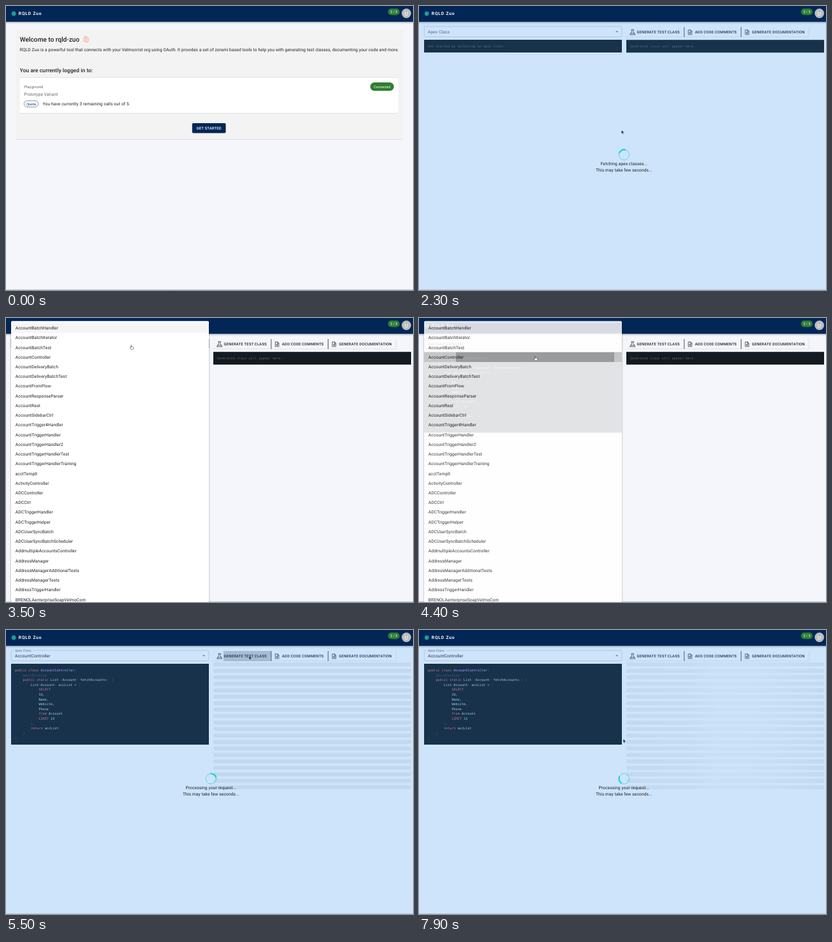
These frames come from a looping animation (640 by 446 pixels, 8000 ms). An HTML page:

```html
<!DOCTYPE html>
<html lang="en">
<head>
<meta charset="utf-8">
<title>RLTC Zuo</title>
<style>
html, body { margin: 0; width: 100%; height: 100%; overflow: hidden; background: #f4f6fb; }
svg { display: block; width: 100vw; height: 100vh; font: 6.77px Roboto, sans-serif; text-rendering: geometricPrecision; }
text { fill: rgba(0,0,0,.87); letter-spacing: .0094em; white-space: pre; }
.mid { text-anchor: middle; }
.grey { fill: rgba(0,0,0,.6); }
.h5 { font-size: 10.16px; font-weight: 500; letter-spacing: 0; }
.h6 { font-size: 8.47px; font-weight: 500; letter-spacing: .0075em; }
.small { font-size: 5.93px; }
.chip { font-size: 5.5px; letter-spacing: 0; }
.btn { font-size: 5.93px; font-weight: 500; letter-spacing: .0286em; }
.light { fill: #fff; }
.code text, text.code { font: 5.18px "DejaVu Sans Mono", monospace; letter-spacing: 0; fill: #c9d1d9; }
text.hint { fill: #535c67; }
.kw { fill: #e2717c; } .name { fill: #c7a4f5; } .num { fill: #6fe0c0; } .dim { fill: #3e4a58; }
.line { fill: none; stroke: rgba(0,0,0,.82); stroke-width: .75; stroke-linejoin: round; stroke-linecap: round; }
.card { filter: drop-shadow(0 .6px .7px rgba(0,0,0,.35)); }
.bar { filter: drop-shadow(0 1px 1.6px rgba(0,0,0,.35)); }

.t { animation: 8s step-end infinite; }
#home { animation-name: home; }
#tool { animation-name: tool; }
#empty { animation-name: empty; }
#picked { animation-name: picked; }
#hover { animation-name: hover; }
#result { animation-name: result; }
#bones { animation-name: bones; }
#sheen { animation-name: sheen; }
#press { animation-name: press; }
#veil { animation-name: veil; }
#fetch { animation-name: fetch; }
#process { animation-name: picked; }
#spin { animation-name: spin; }
#menu { animation-name: menu; transform-origin: 163px 40px; }
#ripple { animation-name: ripple; }
#cursor { animation-name: cursor; }
#hand { animation-name: hand; }
#arrow { animation-name: arrow; }

@keyframes home { 0% { opacity: 1 } 6.25%, 100% { opacity: 0 } }
@keyframes tool { 0% { opacity: 0 } 6.25%, 100% { opacity: 1 } }
@keyframes empty { 0% { opacity: 1 } 55%, 100% { opacity: 0 } }
@keyframes fetch { 0% { opacity: 1 } 55%, 100% { opacity: 0 } }
@keyframes picked { 0% { opacity: 0 } 55%, 100% { opacity: 1 } }
@keyframes hover { 0% { opacity: 0 } 38.75% { opacity: 1 } 55%, 100% { opacity: 0 } }
@keyframes result { 0% { opacity: 1 } 66.25%, 100% { opacity: 0 } }
@keyframes bones { 0% { opacity: 0 } 66.25% { opacity: 1 } 72.5%, 100% { opacity: 0 } }
@keyframes sheen { 0% { opacity: 0 } 72.5%, 100% { opacity: 1 } }
@keyframes press { 0% { opacity: 0 } 65% { opacity: .4 } 66.25% { opacity: 1 } 71.25%, 100% { opacity: 0 } }
@keyframes veil {
  0% { opacity: 0 } 6.25% { opacity: .35 } 7.5% { opacity: .7 } 8.75% { opacity: 1 } 30% { opacity: 0 }
  66.25% { opacity: .35 } 67.5% { opacity: .7 } 68.75%, 100% { opacity: 1 }
}
@keyframes spin {
  0% { transform: rotate(-264deg); animation-timing-function: steps(25) }
  31.25% { transform: rotate(336deg) }
  62.5% { transform: rotate(-128deg); animation-timing-function: steps(30) }
  100% { transform: rotate(592deg) }
}
@keyframes menu {
  0% { opacity: 0; transform: scale(1) }
  41.25% { opacity: .5; transform: scale(.95, .9) }
  42.5% { opacity: .9; transform: scale(.99, .98) }
  43.75% { opacity: 1; transform: scale(1) }
  55% { opacity: .88; transform: scale(1) }
  56.25% { opacity: .4 }
  57.5%, 100% { opacity: 0; transform: scale(1) }
}
@keyframes ripple { 0% { opacity: 0 } 53.75% { opacity: .5 } 55%, 100% { opacity: 1 } }
@keyframes hand { 0% { opacity: 1 } 6.25% { opacity: 0 } 38.75% { opacity: 1 } 67.5%, 100% { opacity: 0 } }
@keyframes arrow { 0% { opacity: 0 } 6.25% { opacity: 1 } 38.75% { opacity: 0 } 67.5%, 100% { opacity: 1 } }
@keyframes cursor {
  0% { opacity: 0; transform: translate(326px, 206px) }
  1.25% { opacity: 1; transform: translate(326px, 206px); animation-timing-function: steps(2) }
  3.75% { transform: translate(318.5px, 195px) }
  33.75% { transform: translate(318.5px, 195px); animation-timing-function: steps(5, start) }
  40% { transform: translate(197px, 42.6px) }
  47.5% { transform: translate(197px, 42.6px); animation-timing-function: steps(4, start) }
  52.5% { transform: translate(182.7px, 60.3px) }
  57.5% { transform: translate(182.7px, 60.3px); animation-timing-function: steps(7, start) }
  66.25% { transform: translate(382.3px, 40.8px) }
  71.25% { transform: translate(382.3px, 40.8px); animation-timing-function: steps(3, start) }
  75% { transform: translate(75px, 138px) }
  87.5% { transform: translate(75px, 138px); animation-timing-function: steps(6, start) }
  95%, 100% { opacity: 1; transform: translate(321.3px, 171.3px) }
}
</style>
</head>
<body>
<svg viewBox="0 0 640 446" preserveAspectRatio="none">
  <defs>
    <linearGradient id="glow" gradientUnits="userSpaceOnUse" x1="326" x2="637" y1="0" y2="0">
      <stop offset="0" stop-opacity=".055"/>
      <stop offset=".3" stop-opacity=".045"/>
      <stop offset=".45" stop-opacity=".025"/>
      <stop offset=".7" stop-opacity=".03"/>
      <stop offset="1" stop-opacity=".055"/>
    </linearGradient>
    <g id="doc" class="line">
      <path d="M-2.5-3.6h3.2l2 2v5.2h-5.2zM.6-3.5v2.1h2M0-.6v2.8M-1.4.8h2.8"/>
    </g>
  </defs>
  <rect width="640" height="446" fill="#f4f6fb"/>

  <g id="home" class="t">
    <rect class="card" x="15" y="38" width="609" height="171.5" rx="1.7" fill="#f3f3f3"/>
    <text class="h5" x="21.7" y="55.5">Welcome to rqld-zuo</text>
    <g transform="translate(126.3 52.5) rotate(-28)" fill="none" stroke-linecap="round">
      <g stroke="#d9a58e" stroke-width="2.2"><path d="M-2.2 0v-3.2M-.4-.5v-4M1.4-.3v-3.5M2.9.6v-2.4M-2 2l-2.3-1.6"/></g>
      <ellipse cy="1.5" rx="3.3" ry="3.2" fill="#f8d6c4" stroke="#d9a58e" stroke-width=".4"/>
      <g stroke="#f8d6c4" stroke-width="1.5"><path d="M-2.2 0v-3.2M-.4-.5v-4M1.4-.3v-3.5M2.9.6v-2.4M-2 2l-2.3-1.6"/></g>
    </g>
    <text x="21.7" y="71.4">RQLD Zuo is a powerful tool that connects with your Velmocrist org using OAuth. It provides a set of zorami based tools to help you with generating test classes, documenting your code and more.</text>
    <text class="h6" x="21.7" y="104">You are currently logged in to:</text>
    <rect class="card" x="22" y="112.5" width="595" height="56" rx="1.7" fill="#fff"/>
    <text class="small grey" x="28.3" y="128.6">Playground</text>
    <text class="grey" x="28.3" y="140.8">Prototype Variant</text>
    <rect x="28.4" y="148.8" width="22.4" height="9.8" rx="4.9" fill="none" stroke="#022756" stroke-width=".5"/>
    <text class="chip mid" x="39.6" y="155.7" style="fill:#022756">Quota</text>
    <text x="57.7" y="156.1">You have currently 3 remaining calls out of 5.</text>
    <rect x="572.8" y="120" width="37.2" height="13.2" rx="6.6" fill="#2e7d32"/>
    <text class="chip mid light" x="591.4" y="128.6">Connected</text>
    <rect class="card" x="292.8" y="184" width="52.7" height="15.4" rx="1.7" fill="#022756"/>
    <text class="btn mid light" x="319.2" y="193.9">GET STARTED</text>
  </g>

  <g id="tool" class="t">
    <rect width="640" height="446" fill="#f4f6fb"/>
    <g id="empty" class="t">
      <rect x="8.2" y="32" width="310.7" height="16.4" rx="1.7" fill="none" stroke="#000" stroke-opacity=".25" stroke-width=".6"/>
      <text class="grey" x="14" y="42.9">Apex Class</text>
      <rect x="8" y="53" width="311" height="20" fill="#141a22"/>
      <text class="code hint" x="14" y="65">Get started by selecting an apex class.</text>
    </g>
    <rect id="hover" class="t" x="8.2" y="32" width="310.7" height="16.4" rx="1.7" fill="none" stroke="#222" stroke-width=".6"/>
    <g id="picked" class="t">
      <path d="M12 32H9.9a1.7 1.7 0 0 0-1.7 1.7v13a1.7 1.7 0 0 0 1.7 1.7h307.3a1.7 1.7 0 0 0 1.7-1.7v-13a1.7 1.7 0 0 0-1.7-1.7H41.5" fill="none" stroke="#000" stroke-opacity=".25" stroke-width=".6"/>
      <text class="grey" x="14" y="33.6" style="font-size:5.08px">Apex Class</text>
      <text x="14" y="42.7">AccountController</text>
      <rect x="8" y="53" width="311" height="127" fill="#141a22"/>
      <g id="source" class="code"></g>
    </g>
    <path d="M308.9 39.4h4.3l-2.15 2.2z" fill="#000" fill-opacity=".55"/>

    <rect class="card" x="326" y="33" width="287.5" height="15.8" rx="1.7" fill="#f3f5fa"/>
    <rect id="press" class="t" x="342" y="33" width="75" height="15.8" fill-opacity=".2"/>
    <path d="M417 33v15.8M506.5 33v15.8" stroke="#1c2a40" stroke-width=".8"/>
    <path class="line" d="M333.8 37.2h4M334.6 37.4v3l-3.1 4.6h8.6l-3.1-4.6v-3M333 42.9h5.6"/>
    <use href="#doc" x="426.3" y="41.2"/>
    <use href="#doc" x="516" y="41.2"/>
    <text class="btn" x="342.6" y="43.3">GENERATE TEST CLASS</text>
    <text class="btn" x="434" y="43.3">ADD CODE COMMENTS</text>
    <text class="btn" x="523.5" y="43.3">GENERATE DOCUMENTATION</text>
    <g id="result" class="t">
      <rect x="326" y="53.2" width="311" height="20" fill="#141a22"/>
      <text class="code hint" x="332" y="65.2">Generated class will appear here.</text>
    </g>
    <g id="bones" class="t" fill-opacity=".06"></g>
    <g id="sheen" class="t" fill="url(#glow)"></g>
  </g>

  <g id="veil" class="t">
    <rect y="24" width="640" height="422" fill="#2d9bff" fill-opacity=".19"/>
    <g transform="translate(322.5 233.6)" fill="none" stroke="#08cfd2">
      <circle r="8.2" stroke-width=".8" stroke-opacity=".75"/>
      <path id="spin" class="t" d="M0-8.1A8.1 8.1 0 0 1 8.1 0" stroke-width="2"/>
    </g>
    <text id="fetch" class="t mid" x="322.3" y="250">Fetching apex classes...</text>
    <text id="process" class="t mid" x="322.3" y="250">Processing your request...</text>
    <text class="mid" x="322.3" y="260.2">This may take few seconds...</text>
  </g>

  <path d="M0 445.6h640" stroke="#aeb4bd" stroke-width=".8"/>
  <rect class="bar" x="-4" y="-4" width="648" height="28.8" fill="#022756"/>
  <circle cx="12.2" cy="12" r="3.4" fill="#1f9c98"/>
  <text class="light" x="19.8" y="14" style="font-weight:700;letter-spacing:.115em">RQLD Zuo</text>
  <rect x="600.6" y="4" width="18.4" height="10.2" rx="5.1" fill="#2e7d32"/>
  <text class="chip mid light" x="609.8" y="11">3 / 5</text>
  <circle cx="629.6" cy="11.5" r="7.4" fill="#bdbdbd"/>
  <text class="mid light" x="629.6" y="14.6" style="font-size:8.47px">U</text>

  <g id="menu" class="t">
    <rect class="bar" x="8" y="4.8" width="311" height="460" rx="1.7" fill="#fff"/>
    <rect x="8" y="8.2" width="311" height="15.2" fill-opacity=".04"/>
    <g id="ripple" class="t">
      <rect x="8" y="53.9" width="311" height="15.2" fill-opacity=".13"/>
      <rect x="58" y="53.9" width="249" height="15.2" fill-opacity=".22"/>
    </g>
    <g id="items"></g>
  </g>

  <g id="cursor" class="t">
    <path id="arrow" class="t" d="M0 0v5.6l1.3-1.2 .9 2 .9-.4-.9-1.9h1.8z" stroke="#fff" stroke-width=".4"/>
    <path id="hand" class="t" d="M-.7.5C-.7-.3.5-.3.5.5v2c.5-.3 1-.2 1.1.2.4-.2.9-.1 1 .3.5-.2 1 .1 1 .6v1.2c0 1-.6 1.300-.7 2.100H-.2C-.4 6-1.500 5.200-2 4.200-2.300 3.400-1.500 3.200-.7 4z" fill="#fff" stroke="#111" stroke-width=".5"/>
  </g>
</svg>
<script>
const $ = id => document.getElementById(id);

function add(parent, tag, attrs = {}, text = '') {
  const node = document.createElementNS('http://www.w3.org/2000/svg', tag);
  for (const key in attrs) node.setAttribute(key, attrs[key]);
  node.textContent = text;
  return parent.appendChild(node);
}

const classes = `AccountBatchHandler AccountBatchIterator AccountBatchTest AccountController
  AccountDeliveryBatch AccountDeliveryBatchTest AccountFromFlow AccountResponseParser AccountRest
  AccountSidebarCtrl AccountTrigger4Handler AccountTriggerHandler AccountTriggerHandler2
  AccountTriggerHandlerTest AccountTriggerHandlerTraining acctTemplt ActivityController
  ADCController ADCCtrl ADCTriggerHandler ADCTriggerHelper ADCUserSyncBatch
  ADCUserSyncBatchScheduler AddmultipleAccountsController AddressManager
  AddressManagerAdditionalTests AddressManagerTests AddressTriggerHandler
  BRENOLAenterpriseSoapVelmoCom`.split(/\s+/);
classes.forEach((name, i) => add($('items'), 'text', { x: 14.8, y: 18.1 + i * 15.23 }, name));

const source = `public class AccountController{
    @AuraEnabled
    public static List <Account> fetchAccounts() {
        List<Account> accList = [
            SELECT
            Id,
            Name,
            Website,
            Phone
            from Account
            LIMIT 10
        ];
        return accList;
    }
}`;
const styles = [
  [/^(public|class|static|SELECT|from|LIMIT|return)$/, 'kw'],
  [/^AccountController$/, 'name'],
  [/^\d+$/, 'num'],
  [/^(@\w+|[<>(){}\[\];]+)$/, 'dim']
];
source.split('\n').forEach((line, i) => {
  const row = add($('source'), 'text', { x: 14, y: 64.9 + i * 7.62 });
  for (const token of line.match(/@?\w+|\s+|[^\w\s]/g)) {
    const style = styles.find(([rule]) => rule.test(token));
    add(row, 'tspan', style ? { class: style[1] } : {}, token);
  }
});

for (const id of ['bones', 'sheen'])
  for (let i = 0; i < 20; i++)
    add($(id), 'rect', { x: 326, y: 50.9 + i * 10.16, width: 311, height: 6.1, rx: 1.7 });
</script>
</body>
</html>
```
